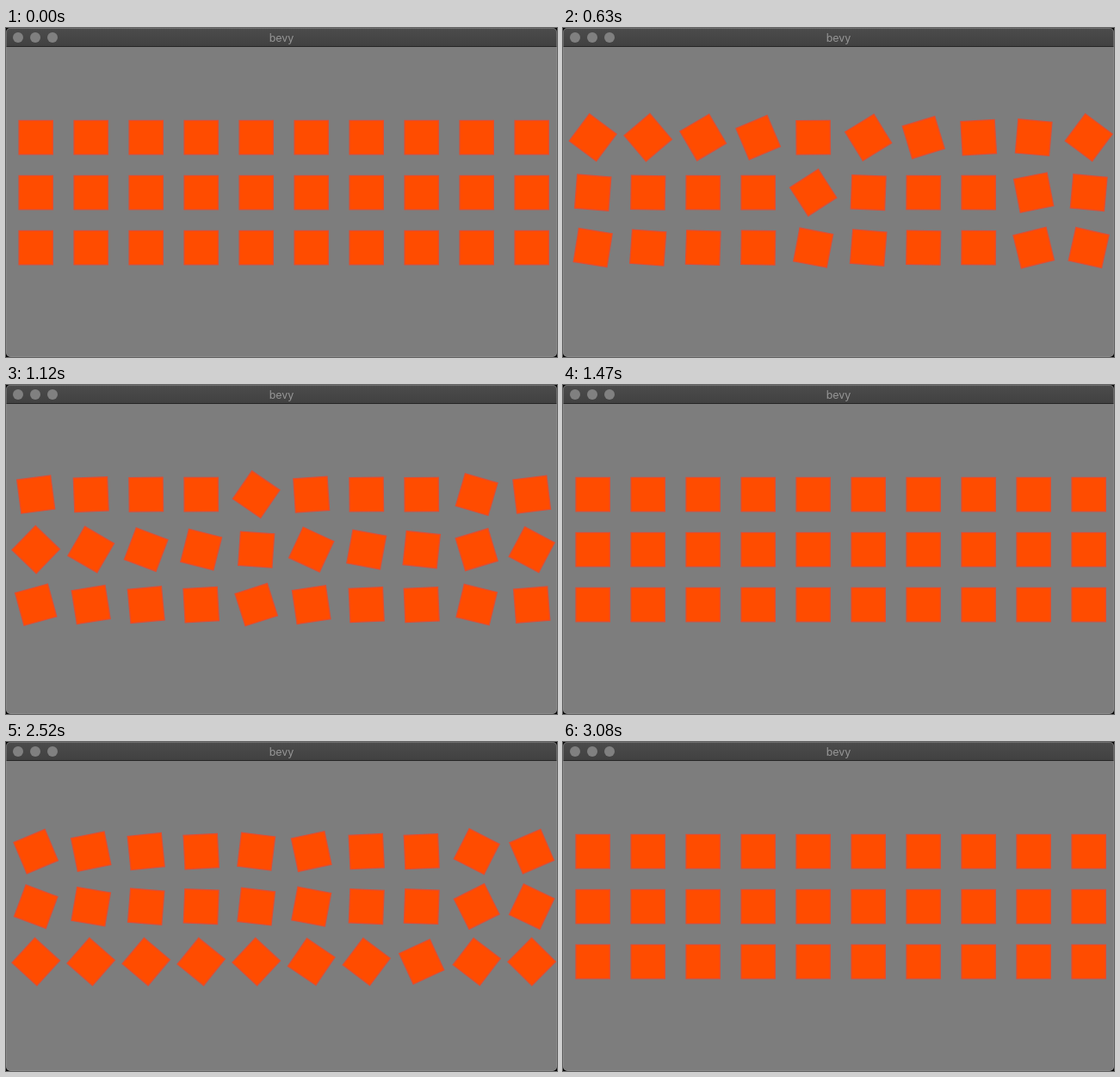
Recreate the animation shown at these times as an HTML page with a canvas. Size 640 by 382 pixels, loop 3150 ms.

```html
<!DOCTYPE html>
<html lang="en">
<head>
<meta charset="utf-8">
<title>bevy</title>
<style>
html, body { margin: 0; width: 100%; height: 100%; overflow: hidden; background: #000; }
.window { position: absolute; left: 0; top: 0; width: 640px; height: 382px; border-radius: 5px; overflow: hidden; background: #7d7d7d; }
.window::after { content: ""; position: absolute; inset: 0; border: 1px solid rgba(150, 150, 150, .45); border-radius: 5px; }
.bar { position: absolute; left: 0; top: 0; width: 640px; height: 22px; box-sizing: border-box; border-bottom: 1px solid #262626;
  background: linear-gradient(#4c4c4c, #414141); color: #969696; font: 12.5px/23px Inter, "Liberation Sans", sans-serif; text-align: center; }
.bar i { position: absolute; top: 5px; width: 12px; height: 12px; border-radius: 50%; background: #808080; }
canvas { position: absolute; left: 0; top: 0; }
</style>
</head>
<body>
<div class="window">
  <canvas id="stage" width="640" height="382"></canvas>
  <div class="bar"><i style="left:8px"></i><i style="left:28px"></i><i style="left:48px"></i>bevy</div>
</div>
<script>
const { PI, sin, cos, sqrt, atan2, min, max } = Math;
const ctx = document.getElementById("stage").getContext("2d");
const LOOP = 3150, STEP = 70, MOVE = 1050, FORWARD = 385, BACK = 1981;

const power = n => x => x ** n;
const sine = x => sin(2 * PI * x) + 1; // a full turn, so it overshoots
const circular = x => 1 - sqrt(max(0, 1 - x * x));
const exponential = x => x <= 0 ? 0 : 2 ** (10 * (x - 1));
const elastic = (x, sign) => sign * sin(26 * PI * x) * 2 ** (10 * (x - 1));
const back = x => x ** 3 - x * sin(PI * x);

function bounce(x) {
  const p = 1 - x;
  if (p < 4 / 11) return 1 - 121 / 16 * p * p;
  if (p < 8 / 11) return 1 - (363 / 40 * p * p - 9.9 * p + 3.4);
  if (p < 0.9) return 1 - (4356 * p * p - 35442 / 5 * p + 16061 / 5) / 361;
  return 1 - (10.8 * p * p - 20.52 * p + 10.72);
}

const families = [power(2), power(3), power(4), power(5), sine,
  circular, exponential, elastic, back, bounce];

const easeIn = (f, p) => f(p, 1);
const easeOut = (f, p) => 1 - f(1 - p, -1);
function easeInOut(f, p) {
  if (f === sine) return (1 - cos(PI * p)) / 2;
  return p < 0.5 ? f(2 * p, 1) / 2 : 1 - f(2 - 2 * p, -1) / 2;
}
const rows = [easeOut, easeIn, easeInOut];

// Normalised quaternion lerp over a quarter turn
const turn = s => 2 * atan2(s * sin(PI / 4), 1 - s + s * cos(PI / 4));

const clamp = x => min(1, max(0, x));

function drawSquare(x, y, angle) {
  ctx.save();
  ctx.translate(x, y);
  ctx.rotate(angle);
  ctx.fillStyle = "#e04d32";
  ctx.fillRect(-20.3, -20.3, 40.6, 40.6);
  ctx.fillStyle = "#ff4c00";
  ctx.fillRect(-19, -19, 38, 38);
  ctx.restore();
}

function draw(now) {
  const time = Math.floor(now % LOOP / STEP) * STEP;
  const p = time < BACK ? clamp((time - FORWARD) / MOVE) : 1 - clamp((time - BACK) / MOVE);
  ctx.clearRect(0, 0, 640, 382);
  rows.forEach((ease, r) => families.forEach((f, c) => {
    const angle = p > 0 && p < 1 ? turn(ease(f, p)) : 0;
    drawSquare(34.7 + 64 * c, 127.1 + 64 * r, angle);
  }));
}

let start;
function tick(now) {
  start ??= now;
  draw(now - start);
  requestAnimationFrame(tick);
}
draw(0);
requestAnimationFrame(tick);
</script>
</body>
</html>
```
